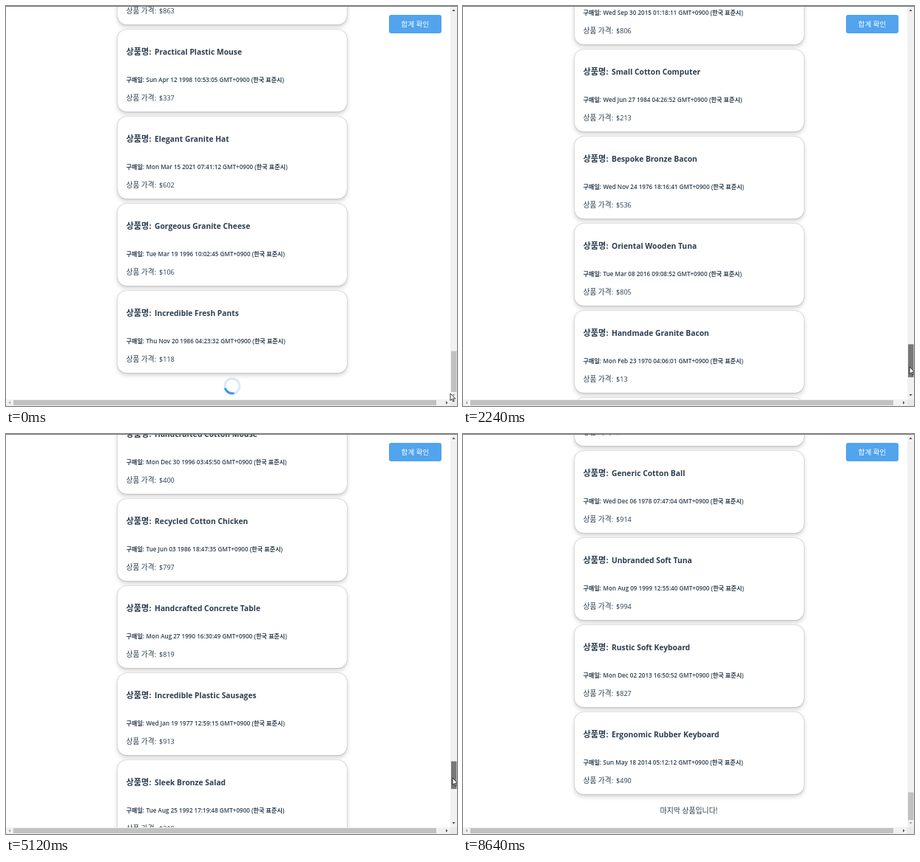
An HTML page that plays this animation: 610x542 px, repeating every 8.72 s.

```html
<!DOCTYPE html>
<html lang="ko">
<head>
<meta charset="utf-8">
<style>
  html, body { margin: 0; width: 100%; height: 100%; overflow: hidden; background: #fff; }
  body { position: relative; color: #2c3e50; font-family: "Open Sans", "Noto Sans", "Noto Sans CJK KR", "Noto Sans CJK JP", "Noto Sans CJK", sans-serif; }
  #view { position: absolute; left: 0; top: 0; width: 601px; height: 533px; overflow: hidden; }
  #list { position: absolute; left: 0; top: 0; width: 601px; }
  .card { position: absolute; left: 151px; width: 310px; height: 111px; border-radius: 12px; background: #fff;
    box-shadow: 0 0 1.5px rgba(0,0,0,.38), 0 3px 6px rgba(0,0,0,.2); }
  .card span { position: absolute; white-space: nowrap; line-height: 16px; }
  .name { top: 22px; font-size: 11.2px; font-weight: 700; }
  .date { top: 60px; font-size: 8.1px; font-weight: 600; }
  .price { top: 85px; font-size: 9.7px; }
  .label { left: 11.5px; }
  .name.value { left: 50px; font-size: 10.3px; }
  .date.value { left: 38.5px; }
  .price.value { left: 56px; font-size: 9.1px; }
  #spinner { position: absolute; left: 293.5px; width: 24px; height: 24px; }
  #end { position: absolute; left: 205.5px; width: 200px; text-align: center; font-size: 9.9px; line-height: 16px; white-space: nowrap; }
  #button { position: absolute; left: 518px; top: 12px; width: 71px; height: 25px; border-radius: 3px; background: #51a4ed;
    color: #fff; text-align: center; font-size: 9.6px; line-height: 25px; white-space: nowrap; }
  #topline { position: absolute; left: 0; top: 0; width: 610px; height: 1px; background: #777; }
  #chrome { position: absolute; left: 0; top: 0; }
</style>
</head>
<body>
<div id="view">
  <div id="list">
    <svg id="spinner" viewBox="-12 -12 24 24" fill="none" stroke-width="3">
      <circle r="10" stroke="#d8e9f8"/>
      <path id="arc" d="M-7.07-7.07A10 10 0 0 1 7.07-7.07" stroke="#4298e3"/>
    </svg>
    <div id="end">마지막 상품입니다!</div>
  </div>
  <div id="button">합계 확인</div>
</div>
<svg id="chrome" width="610" height="542">
  <path d="M601 0H610V533H601ZM0 533H601V542H0Z" fill="#f1f1f1"/>
  <path d="M601 533H610V542H601Z" fill="#e9e9e9"/>
  <rect id="hthumb" x="10" y="534" width="572" height="7"/>
  <rect id="vthumb" x="602" width="7.5"/>
  <path d="M603.3 7L605.5 4.5L607.7 7ZM595 535.3L597.5 537.5L595 539.7Z" fill="#505050"/>
  <path d="M6 535.3L3.5 537.5L6 539.7Z" fill="#a3a3a3"/>
  <path id="down" d="M603.3 526L605.5 528.5L607.7 526Z"/>
  <path id="cursor" d="M0 0V9.5L2.2 7.5L3.7 11L5.2 10.4L3.7 7H6.7Z" fill="#fff" stroke="#222" stroke-width=".9"/>
</svg>
<div id="topline"></div>
<script>
const LOOP = 8720, STEP = 80, VIEW = 533, PITCH = 118, HEAD = 181, FIRST = 35;
const TRACK = { top: 10, size: 513 };
const FIRST_LOAD = 800, SECOND_LOAD = 3920;

const products = `Tasty Rubber Gloves|Fri May 07 2004 11:20:36|863
Practical Plastic Mouse|Sun Apr 12 1998 10:53:05|337
Elegant Granite Hat|Mon Mar 15 2021 07:41:12|602
Gorgeous Granite Cheese|Tue Mar 19 1996 10:02:45|106
Incredible Fresh Pants|Thu Nov 20 1986 04:23:32|118
Intelligent Concrete Pizza|Sat Jul 14 1990 13:08:27|542
Rustic Metal Chair|Tue Oct 03 2000 09:31:50|275
Modern Frozen Shirt|Thu Jan 22 1987 20:14:09|690
Luxurious Steel Soap|Wed Sep 30 2015 01:18:11|806
Small Cotton Computer|Wed Jun 27 1984 04:26:52|213
Bespoke Bronze Bacon|Wed Nov 24 1976 18:16:41|536
Oriental Wooden Tuna|Tue Mar 08 2016 09:08:52|805
Handmade Granite Bacon|Mon Feb 23 1970 04:06:01|13
Recycled Granite Salad|Sat Feb 18 1995 15:17:00|911
Handcrafted Cotton Mouse|Mon Dec 30 1996 03:45:50|400
Recycled Cotton Chicken|Tue Jun 03 1986 18:47:35|797
Handcrafted Concrete Table|Mon Aug 27 1990 16:30:49|819
Incredible Plastic Sausages|Wed Jan 19 1977 12:59:15|913
Sleek Bronze Salad|Tue Aug 25 1992 17:19:48|318
Awesome Wooden Shoes|Fri Apr 11 2008 06:52:30|471
Licensed Fresh Towels|Sun Oct 20 2002 14:05:18|246
Generic Cotton Ball|Wed Dec 06 1978 07:47:04|914
Unbranded Soft Tuna|Mon Aug 09 1999 12:55:40|994
Rustic Soft Keyboard|Mon Dec 02 2013 16:50:52|827
Ergonomic Rubber Keyboard|Sun May 18 2014 05:12:12|490`.split("\n");

const scrollKeys = [[0, 4397], [1760, 4397], [2240, 5314], [2320, 5340], [2560, 5577],
  [4720, 5577], [5120, 5993], [5200, 6167], [5440, 6766]];
const cursorKeys = [[0, 601, 525], [960, 601, 525], [1360, 604, 461], [1600, 604, 412], [1680, 604, 412],
  [2240, 604, 489], [2480, 604, 509], [2800, 606, 540], [3600, 606, 540], [4160, 604, 424],
  [4640, 604, 424], [5120, 604, 466], [5360, 604, 507], [5520, 604, 507], [6000, 477, 511], [6160, 465, 545]];

const $ = id => document.getElementById(id);
const within = (t, a, b) => t >= a && t < b;
const set = (el, attrs) => { for (const k in attrs) el.setAttribute(k, attrs[k]); };
const cardTop = i => HEAD + i * PITCH;

function sample(keys, t) {
  const n = keys.findIndex(k => k[0] > t);
  if (n < 0) return keys[keys.length - 1].slice(1);
  const a = keys[n - 1], b = keys[n], p = (t - a[0]) / (b[0] - a[0]);
  return a.slice(1).map((v, i) => v + (b[i + 1] - v) * p);
}

const cards = products.map((line, i) => {
  const [name, date, price] = line.split("|");
  const card = document.createElement("div");
  card.className = "card";
  card.style.top = cardTop(FIRST + i) + "px";
  const rows = [["name", "상품명:", name], ["date", "구매일:", `${date} GMT+0900 (한국 표준시)`], ["price", "상품 가격:", "$" + price]];
  for (const [kind, label, value] of rows) {
    for (const [role, text] of [["label", label], ["value", value]]) {
      const span = document.createElement("span");
      span.className = `${kind} ${role}`;
      span.textContent = text;
      card.append(span);
    }
  }
  $("list").append(card);
  return card;
});

function render(t) {
  const count = t < FIRST_LOAD ? 40 : t < SECOND_LOAD ? 50 : 60;
  const done = count === 60;
  const lastTop = cardTop(count - 1);
  const height = lastTop + (done ? 156 : 147);
  const scroll = sample(scrollKeys, t)[0];

  cards.forEach((card, i) => card.style.display = FIRST + i < count ? "" : "none");
  $("list").style.transform = `translateY(${-Math.round(scroll)}px)`;
  $("spinner").style.display = done ? "none" : "";
  $("spinner").style.top = lastTop + 117 + "px";
  $("end").style.display = done ? "" : "none";
  $("end").style.top = lastTop + 125 + "px";
  const phase = count === 40 ? 210 : 64;
  set($("arc"), { transform: `rotate(${phase + t * .36})` });

  // The page repaints one step behind the dragged thumb.
  const ahead = sample(scrollKeys, t + STEP)[0];
  const dragging = within(t, 1680, 2640) || within(t, 4640, 5520);
  set($("vthumb"), {
    y: TRACK.top + TRACK.size * ahead / height,
    height: TRACK.size * VIEW / height,
    fill: dragging ? "#787878" : "#c1c1c1"
  });
  set($("hthumb"), { fill: within(t, 5920, 6160) ? "#a8a8a8" : "#c1c1c1" });
  set($("down"), { fill: scroll + VIEW >= height - 1 ? "#a3a3a3" : "#505050" });

  const [x, y] = sample(cursorKeys, t);
  set($("cursor"), { transform: `translate(${x} ${y})`, visibility: t < 6160 ? "visible" : "hidden" });
}

const start = performance.now();
function tick() {
  const t = (performance.now() - start) % LOOP;
  render(Math.floor(t / STEP) * STEP);
  requestAnimationFrame(tick);
}
tick();
</script>
</body>
</html>
```
